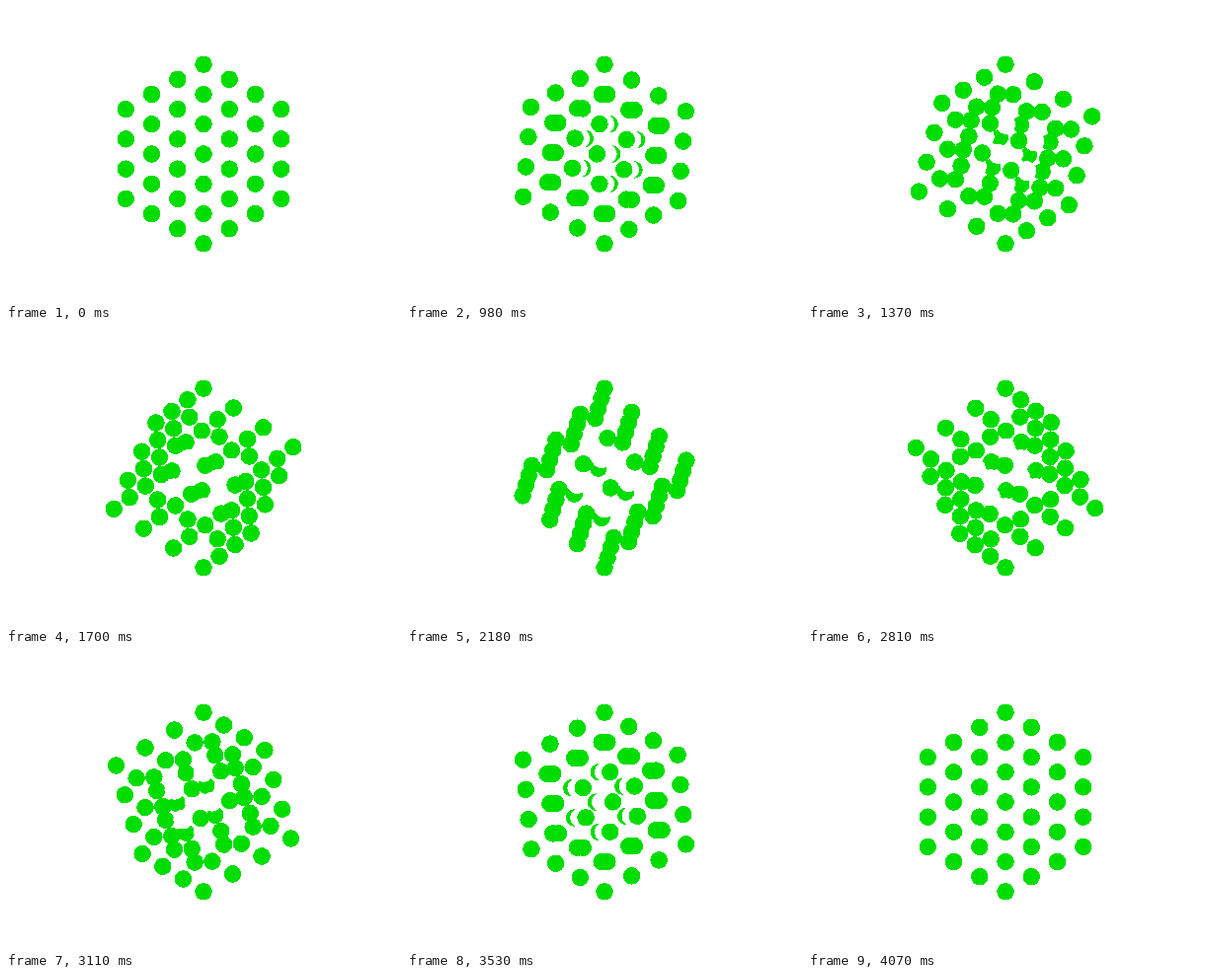
Animation of 400x300 px, one loop 8000 ms. Source, as an HTML page with a canvas:

```html
<!DOCTYPE html>
<html lang="en">
<head>
<meta charset="utf-8">
<title>Turning cube of dots</title>
<style>
  html, body { margin: 0; width: 100%; height: 100%; overflow: hidden; background: #fff; }
  canvas { display: block; }
</style>
</head>
<body>
<canvas id="stage" width="400" height="300"></canvas>
<script>
const ctx = document.getElementById('stage').getContext('2d');
const LOOP = 8000, HOLD = 500, STEP = 30, STEPS = 120;
const UNIT = 90.84 / 3, DOT = 8.66, CORE = 10;
const GREEN = '#00dd00', WHITE = '#ffffff';

// 4 x 4 x 4 lattice; the hidden core is white and masks what lies behind it
const levels = [-1.5, -0.5, 0.5, 1.5];
const points = levels.flatMap(a => levels.flatMap(b => levels.map(c => [a, b, c])));
const isCore = p => p.every(v => Math.abs(v) < 1);

const easeInOut = t => t < 0.5 ? 2 * t * t : 1 - 2 * (1 - t) * (1 - t);

// Turn the cube about its body diagonal, seen along another diagonal
function project(p, angle) {
  let sum = 0, across = 0, away = 0;
  p.forEach((v, i) => {
    const phi = angle + i * 2 * Math.PI / 3;
    sum += v;
    across += v * Math.sin(phi);
    away += v * Math.cos(phi);
  });
  const core = isCore(p);
  return {
    x: 200 + UNIT * across,
    y: 150 - UNIT / 3 * (2 * sum + away),
    depth: sum - 4 * away,
    radius: core ? CORE : DOT,
    color: core ? WHITE : GREEN
  };
}

// Hard-edged disc, one pixel row at a time
function disc({ x, y, radius, color }) {
  ctx.fillStyle = color;
  for (let row = Math.floor(y - radius); row <= y + radius; row++) {
    const dy = row + 0.5 - y;
    if (Math.abs(dy) >= radius) continue;
    const half = Math.sqrt(radius * radius - dy * dy);
    const left = Math.round(x - half);
    ctx.fillRect(left, row, Math.round(x + half) - left, 1);
  }
}

function draw(time) {
  const step = Math.floor((time % LOOP - HOLD) / STEP) + 1;
  const progress = Math.min(Math.max(step / STEPS, 0), 1);
  const angle = easeInOut(progress) * 2 * Math.PI / 3;
  ctx.fillStyle = WHITE;
  ctx.fillRect(0, 0, 400, 300);
  points.map(p => project(p, angle))
    .sort((a, b) => a.depth - b.depth)
    .forEach(disc);
}

const start = performance.now();
function tick() {
  draw(performance.now() - start);
  requestAnimationFrame(tick);
}
tick();
</script>
</body>
</html>
```
